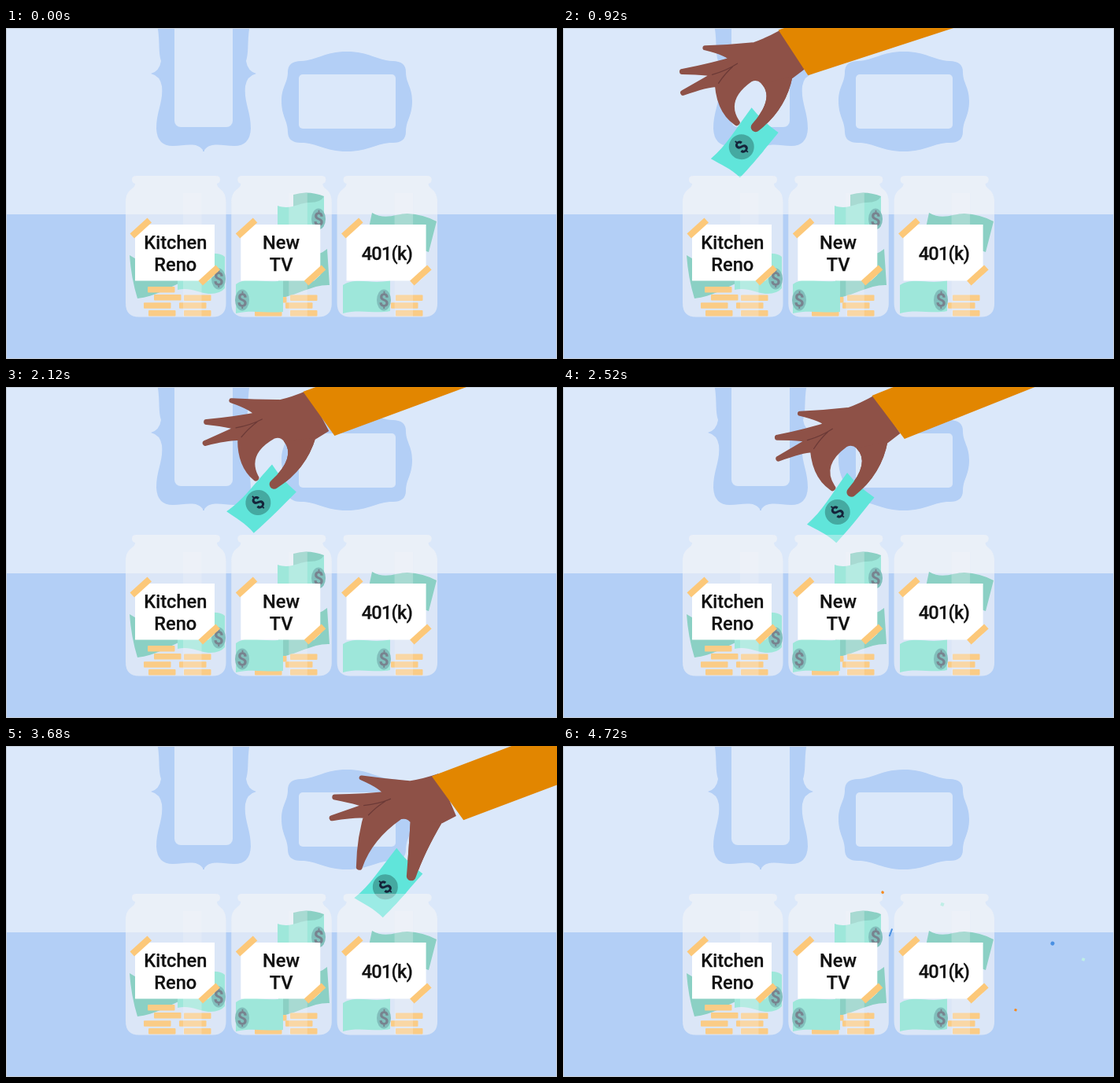
An HTML page that plays this animation: 700 by 421 pixels, repeating every 4.76 s.

```html
<!DOCTYPE html>
<html lang="en">
<head>
<meta charset="utf-8">
<title>Savings jars</title>
<style>
html, body { margin: 0; width: 100%; height: 100%; overflow: hidden; background: #dbe8fa; }
svg { display: block; width: 100vw; height: 100vh; }
text { font-family: Roboto, "Liberation Sans", sans-serif; text-anchor: middle; }
.label { font-size: 23.6px; font-weight: 500; fill: #111; stroke: #111; stroke-width: .25; }
.dollar { font-size: 23px; font-weight: 700; }
</style>
</head>
<body>
<svg viewBox="0 0 700 421" preserveAspectRatio="none">
  <defs>
    <path id="jar" d="M166,188H266Q272,188 272,192.500Q272,197 268,198C268,206 279.500,204 279.500,222V350Q279.500,367.500 262,367.500H169Q152,367.500 152,350V222C152,204 164,206 164,198Q160,197 160,192.500Q160,188 166,188Z"/>
    <path id="tallHalf" d="M1,-4H-59C-55,14 -58,30 -54,42Q-56,55 -67,58Q-55,61 -53,74C-51,95 -60,105 -60,128Q-59,150 -39,150C-23,150 -7,144 0,157H1Z"/>
    <path id="wideHalf" d="M1,30H0C-28,30 -38,41 -58,42Q-75,42 -75,56C-75,70 -83,75 -83,93C-83,112 -75,118 -75,132Q-75,146 -58,146C-38,146 -28,157 0,157H1Z"/>
    <clipPath id="aboveLabel"><rect width="700" height="300"/></clipPath>
  </defs>
  <rect width="700" height="421" fill="#dbe8fa"/>
  <rect y="237" width="700" height="184" fill="#b3cff6"/>
  <g transform="translate(251 0)" fill="#b3cff6">
    <use href="#tallHalf"/><use href="#tallHalf" transform="scale(-1 1)"/>
    <rect x="-37" y="-20" width="74" height="146" rx="8" fill="#dbe8fa"/>
  </g>
  <g transform="translate(433 0)" fill="#b3cff6">
    <use href="#wideHalf"/><use href="#wideHalf" transform="scale(-1 1)"/>
    <rect x="-61" y="59" width="123" height="69" rx="5" fill="#dbe8fa"/>
  </g>
  <rect x=".5" y=".5" width="699" height="420" fill="none" stroke="#c6ced9"/>
  <g id="backs"></g>
  <g id="hand">
    <path id="palm" fill="#8e5147"/>
    <path d="M188,59Q206,54 220,45M196,70Q204,58 214,49" fill="none" stroke="#6c3a37" stroke-width="1.3" stroke-linecap="round"/>
  </g>
  <g clip-path="url(#aboveLabel)">
    <g id="bill">
      <path d="M238,101Q252,119 272,133C256,152 244,168 223,190C212,179 198,173 186,166C206,149 217,129 238,101Z" fill="#60e5da"/>
      <circle cx="225" cy="151" r="16" fill="#45a9a1"/>
      <text class="dollar" transform="translate(225 151) rotate(-50)" y="8" fill="#15243a">$</text>
    </g>
  </g>
  <path id="thumb" fill="#8e5147"/>
  <path id="sleeve" d="M310,60L272,2.500L841,-186L879,-128Z" fill="#e28600"/>
  <g id="fronts"></g>
  <g id="confetti"></g>
</svg>
<script>
const LOOP = 4760, RELEASE = 3610, BURST = 3940;
const $ = id => document.getElementById(id);
const clamp = x => Math.max(0, Math.min(1, x));
const smooth = x => { x = clamp(x); return x * x * (3 - 2 * x); };
const mix = (a, b, k) => a.map((v, i) => v + (b[i] - v) * k);

// --- jars ---
const LIGHT = '#66dfc8', DARK = '#46b9a3', GLASS = '#f3f3f6', STEP = 134.3;
const sheet = (d, fill) => `<path d="${d}" fill="${fill}"/>`;
const emblem = (x, y) => `<ellipse cx="${x}" cy="${y}" rx="9" ry="13.500" fill="#369c95"/>
  <text class="dollar" x="${x}" y="${y + 8}" fill="#26384a">$</text>`;
const coin = (x, y) => `<rect x="${x}" y="${y}" width="34.500" height="7.500" rx="1" fill="#ffb23c"/>`;
const stack = (x, rows) => Array.from({ length: rows }, (_, i) => coin(x - 6 * (i % 2), 359 - 9.8 * i)).join('');

const jars = [
  { lines: ['Kitchen', 'Reno'], stuff:
    sheet('M157,289Q190,310 230,308L225,323C205,330 190,342 167,344Q159,318 157,289Z', DARK) +
    stack(181, 2) + coin(188, 339) + coin(180, 329) + stack(226, 3) +
    sheet('M218,312V333C235,329 246,338 260,338Q272,338 278,331V291Q272,286 260,287Z', LIGHT) +
    emblem(270, 319) },
  { lines: ['New', 'TV'], stuff:
    sheet('M365,212Q384,206 404,214V235H365Z', DARK) +
    sheet('M345,226C362,232 372,222 386,222Q400,222 404,214V252Q398,258 386,257H345Z', LIGHT) +
    emblem(397, 243) +
    sheet('M380,290Q398,290 408,281L411,327C390,326 370,340 346,344V318Z', DARK) +
    coin(322, 342) + coin(316, 359) + stack(361, 3) +
    sheet('M292,326C308,314 326,326 352,321V361C330,363 312,358 292,363Z', LIGHT) +
    emblem(300, 346) },
  { lines: ['401(k)'], stuff:
    sheet('M465,235C482,245 496,236 510,236Q530,237 547,246L537,285Q500,270 456,278Z', DARK) +
    stack(495, 3) +
    sheet('M428,327C446,316 464,327 488,321V360C468,364 450,357 428,363Z', LIGHT) +
    emblem(480, 346) }
];

const tape = (x, y) => `<path d="M${x},${y}l22,-20l5.500,6l-22,20Z" fill="#fcc879"/>`;
const shift = i => `transform="translate(${i * STEP} 0)"`;

$('backs').innerHTML = jars.map((j, i) =>
  `<use href="#jar" ${shift(i)} fill="${GLASS}" fill-opacity=".36"/>`).join('');

$('fronts').innerHTML = jars.map((j, i) => {
  const single = j.lines.length === 1;
  const words = j.lines.map((s, row) => `<text class="label" x="215.300" y="${(single ? 294.5 : 281) + 28 * row}"
    letter-spacing="${single ? -.8 : 0}">${s}</text>`).join('');
  return `${j.stuff}<g ${shift(i)}>
    <use href="#jar" fill="${GLASS}" fill-opacity=".4"/>
    <rect x="225" y="210" width="23.500" height="157" fill="${GLASS}" fill-opacity=".27"/>
    <path d="M172,250H265V314L257,321.500H164V257Z" fill="#fff"/>
    ${words}${tape(157.5, 261.5)}${tape(244.5, 321.5)}</g>`;
}).join('');

// --- hand ---
// a tapered digit from base a-b, bending at knuckle k, to a round tip
function digit(a, b, k, w, tip, r) {
  const len = Math.hypot(tip[0] - k[0], tip[1] - k[1]);
  const nx = (k[1] - tip[1]) / len, ny = (tip[0] - k[0]) / len;
  const off = (p, d) => `${p[0] + nx * d},${p[1] + ny * d}`;
  return `M${a}Q${off(k, w)} ${off(tip, r)}A${r} ${r} 0 0 0 ${off(tip, -r)}Q${off(k, -w)} ${b}Z`;
}

const PALM = 'M306,52L274,3Q256,13 238,19L204,44L190,64L238,68Q245,65 250,70L290,64Z' +
  digit([240, 18], [212, 43], [208, 28], 7, [179, 25], 3) +
  digit([222, 34], [198, 64], [186, 52], 7, [150, 55], 3.5) +
  digit([212, 44], [196, 75], [184, 67], 7, [151, 82], 3.5);
const indexAt = k => digit([191, 62], [238, 68], mix([198, 98], [196, 100], k), 10, mix([219, 120], [196, 137], k), 4);
const thumbAt = k => digit([250, 70], [290, 62], mix([275, 96], [264, 105], k), 10, mix([243, 126], [263, 137], k), 6);

// time, x, y, hand angle, sleeve angle
const STOPS = [
  [0, 560, 100, -4, -4], [760, 2, -2, 0, 0], [1600, -4, -11.5, -1.5, 2.8], [2200, 112, 3.5, 5.7, -2.3],
  [2720, 127, 9, -4, -4], [3300, 270, 36, 10, -2.4], [3720, 270, 35, 10, -2.4], [4300, 580, -60, 2, 2]
];
const bump = (t, mid, width) => Math.exp(-(((t - mid) / width) ** 2));

function poseAt(t) {
  const i = Math.max(1, STOPS.findIndex(s => s[0] > t));
  const a = STOPS[i - 1], b = STOPS[i];
  const [, x, y, hand, sleeve] = t >= 4300 ? STOPS[STOPS.length - 1] : mix(a, b, smooth((t - a[0]) / (b[0] - a[0])));
  return { x, y: y + 28 * bump(t, 1040, 80) + 14 * bump(t, 3340, 90), hand, sleeve };
}

const place = (id, p, turn, extra = '') =>
  $(id).setAttribute('transform', `${extra}translate(${p.x} ${p.y}) rotate(${turn} 292 30)`);

function drawArm(t) {
  const p = poseAt(t), held = poseAt(Math.min(t, RELEASE));
  const open = smooth((t - 3520) / 140);
  const fall = Math.max(0, t - RELEASE);
  $('palm').setAttribute('d', PALM + indexAt(open) + thumbAt(open));
  $('thumb').setAttribute('d', thumbAt(open));
  place('hand', p, p.hand);
  place('thumb', p, p.hand);
  place('sleeve', p, p.sleeve);
  place('bill', held, held.hand,
    `translate(${.1 * Math.min(fall, 70)} ${.00125 * fall * fall}) rotate(${-.12 * Math.min(fall, 70)} 478 174) `);
}

// --- confetti ---
let seed = 11;
const rnd = () => (seed = (seed * 16807) % 2147483647) / 2147483647;
const COLORS = ['#f58a1f', '#16bfae', '#fcc48a', '#4a90e2', '#bfeee6'];
const bits = Array.from({ length: 48 }, (_, i) => ({
  x: 366 + 300 * rnd(), y: 160 + 210 * rnd(), color: COLORS[i % COLORS.length],
  rise: 50 + 110 * rnd(), life: .55 + .6 * rnd(), size: 5 + 3 * rnd(),
  spin: 700 * (rnd() - .5), thin: rnd() < .3, round: rnd() < .5
}));
$('confetti').innerHTML = bits.map(b => {
  const w = b.thin ? .35 : 1, h = b.thin ? 1.8 : 1;
  return `<rect x="${-w / 2}" y="${-h / 2}" width="${w}" height="${h}" rx="${b.round ? .5 : .1}" fill="${b.color}"/>`;
}).join('');

function drawConfetti(t) {
  const u = (t - BURST) / 780, e = 1 - (1 - u) ** 2;
  bits.forEach((b, i) => {
    const el = $('confetti').children[i], on = u > 0 && u < b.life;
    el.style.display = on ? '' : 'none';
    if (!on) return;
    const x = 484 + (b.x - 484) * e;
    const y = 185 + (b.y - 185) * e - 4 * b.rise * e * (1 - e);
    const s = b.size * Math.min(1, .4 + 3 * (1 - u / b.life));
    el.setAttribute('transform', `translate(${x} ${y}) rotate(${20 + b.spin * (1 - u)}) scale(${s})`);
  });
}

const start = performance.now();
function frame() {
  const t = Math.floor((performance.now() - start) % LOOP / 40) * 40;
  drawArm(t);
  drawConfetti(t);
  requestAnimationFrame(frame);
}
frame();
</script>
</body>
</html>
```
